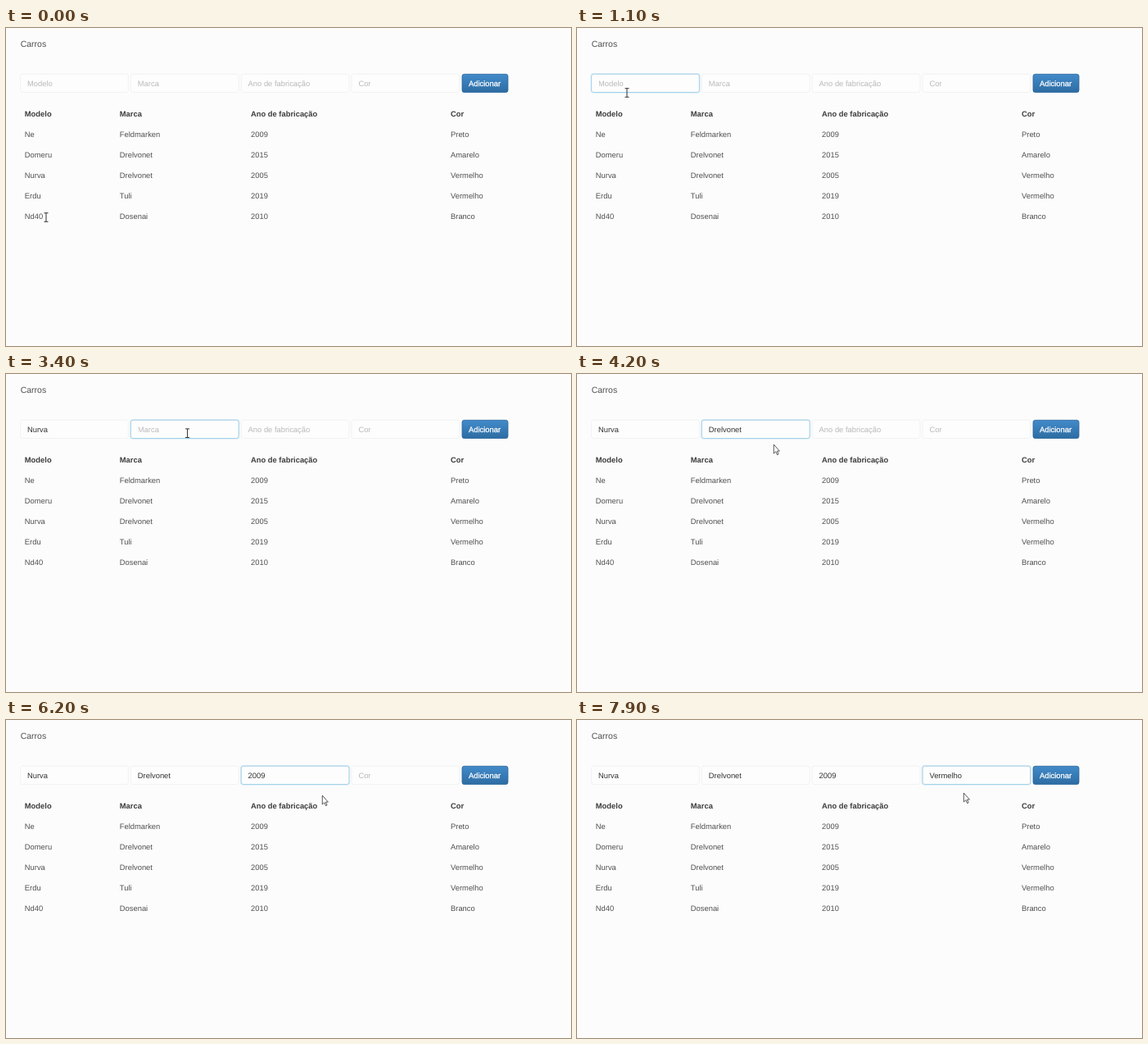
Write an HTML page that moves like this. It is 690 by 388 pixels and loops after 8 s.

```html
<!DOCTYPE html>
<html lang="pt">
<head>
<meta charset="utf-8">
<title>Carros</title>
<style>
  html, body { margin: 0; width: 100%; height: 100%; overflow: hidden; background: #fcfcfc; }
  svg { display: block; width: 690px; height: 388px; }
  text { font: 9.4px "Liberation Sans", Arial, sans-serif; fill: #505050; text-rendering: geometricPrecision; }
  .title { font-size: 10.5px; }
  .head { font-weight: bold; fill: #3c3c3c; }
  .field rect { fill: #fdfdfd; }
  .hint { fill: #b9b9b9; }
  .value { fill: #333; }
  .caret { fill: #222; }
  .button { fill: #fff; stroke: #fff; stroke-width: .3px; }
</style>
</head>
<body>
<svg id="stage" viewBox="0 0 690 388" xmlns="http://www.w3.org/2000/svg">
  <defs>
    <linearGradient id="blue" x2="0" y2="1">
      <stop stop-color="#428bca"/><stop offset="1" stop-color="#2d6ca2"/>
    </linearGradient>
  </defs>
  <text class="title" x="17.7" y="22.8">Carros</text>
  <g id="table"></g>
  <g id="form"></g>
  <rect x="557" y="56.3" width="56" height="22.2" rx="2.6" fill="url(#blue)" stroke="#2b669a" stroke-width=".8"/>
  <text class="button" x="565" y="71">Adicionar</text>
  <g id="pointer">
    <path id="arrow" d="M.3 0V11L2.8 8.7L4.5 12.6L6.1 11.9L4.4 8.1H7.4Z" fill="#fff" stroke="#333" stroke-width=".8"/>
    <path id="beam" d="M-2.5-5.3H2.5M0-5.3V5.3M-2.5 5.3H2.5" fill="none" stroke="#333"/>
  </g>
</svg>
<script>
const LOOP = 8000, STEP = 100, BLINK = 500;
const $ = id => document.getElementById(id);

function add(parent, tag, attrs, text = '') {
  const el = document.createElementNS('http://www.w3.org/2000/svg', tag);
  for (const k in attrs) el.setAttribute(k, attrs[k]);
  el.textContent = text;
  return parent.appendChild(el);
}

const labels = ['Modelo', 'Marca', 'Ano de fabricação', 'Cor'];
const columns = [22.8, 138.8, 299, 543];
const cars = [
  ['Ne', 'Feldmarken', '2009', 'Preto'],
  ['Domeru', 'Drelvonet', '2015', 'Amarelo'],
  ['Nurva', 'Drelvonet', '2005', 'Vermelho'],
  ['Erdu', 'Tuli', '2019', 'Vermelho'],
  ['Nd40', 'Dosenai', '2010', 'Branco']
];

labels.forEach((s, i) => add($('table'), 'text', { class: 'head', x: columns[i], y: 108 }, s));
cars.forEach((car, r) => car.forEach((s, i) =>
  add($('table'), 'text', { x: columns[i], y: 133.4 + r * 25 }, s)));

// Hovering a suggestion previews it; picking it moves the caret to the end.
const steps = [
  { focus: 1000, previews: [[1500, 'Nurva']], pick: 2100 },
  { focus: 3000, previews: [[3500, 'Drelvonet']], pick: 4000 },
  { focus: 4700, previews: [[5100, '2019'], [5200, '2009']], pick: 6000 },
  { focus: 6700, previews: [[7300, 'Vermelho']], pick: 7800 }
];

const fields = steps.map((s, i) => {
  const x = 17.6 + i * 134.8;
  const g = add($('form'), 'g', { class: 'field' });
  const box = { x, y: 56.2, width: 131.8, height: 22.3, rx: 2.6 };
  return {
    ...s, x: x + 8.4,
    blur: i < 3 ? steps[i + 1].focus : Infinity,
    glow: add(g, 'rect', { ...box, stroke: '#d9eef8', 'stroke-width': 2.4 }),
    frame: add(g, 'rect', { ...box, stroke: '#f0f1f1', 'stroke-width': .9 }),
    ring: add(g, 'rect', { ...box, stroke: '#9dcfe8', 'stroke-width': .9 }),
    hint: add(g, 'text', { class: 'hint', x: x + 8.4, y: 71 }, labels[i]),
    value: add(g, 'text', { class: 'value', x: x + 8.4, y: 71 }),
    caret: add(g, 'rect', { class: 'caret', y: 62.2, width: .9, height: 10.6 })
  };
});

// Pointer stops: time, x, y
const path = [
  [0, 49, 231], [800, 61, 79], [1300, 61, 79], [1600, 57, 98],
  [2000, 57, 98], [2400, 119, 84], [2700, 222, 68], [3300, 222, 68],
  [3700, 219, 95], [3900, 219, 95], [4200, 240, 86], [4700, 322, 70],
  [4900, 322, 70], [5100, 326, 88], [5300, 330, 117], [5900, 330, 117],
  [6200, 386, 92], [6700, 462, 69], [6900, 462, 69], [7500, 470, 95],
  [7700, 470, 95], [7900, 472, 89], [LOOP, 472, 89]
];

const same = (a, b) => a[1] === b[1] && a[2] === b[2];

function slope(i, k) {
  const a = path[i - 1], p = path[i], b = path[i + 1];
  if (!a || !b || same(a, p) || same(p, b)) return 0;
  return (b[k] - a[k]) / (b[0] - a[0]);
}

function pointerAt(t) {
  let i = 0;
  while (i < path.length - 2 && t >= path[i + 1][0]) i++;
  const a = path[i], b = path[i + 1], d = b[0] - a[0], u = (t - a[0]) / d;
  const s = u * u * (3 - 2 * u);
  return [1, 2].map(k => a[k] + (b[k] - a[k]) * s
    + d * u * (1 - u) * ((1 - u) * slope(i, k) - u * slope(i + 1, k)));
}

const clamp = v => Math.min(1, Math.max(0, v));
const fade = (t, from) => clamp((t - from + 100) / 200);
const show = (el, on) => el.setAttribute('visibility', on ? 'visible' : 'hidden');

function drawField(f, t) {
  const lit = t < f.focus ? 0 : t < f.blur ? fade(t, f.focus) : 1 - fade(t, f.blur);
  f.ring.setAttribute('opacity', lit);
  f.glow.setAttribute('opacity', lit);
  f.ring.style.fill = f.glow.style.fill = 'none';

  const shown = f.previews.filter(p => t >= p[0]).pop();
  f.value.textContent = shown ? shown[1] : '';
  show(f.hint, !shown);

  const picked = t >= f.pick;
  const since = picked ? f.pick : shown ? shown[0] : f.focus;
  const on = t >= f.focus && t < f.blur && Math.floor((t - since) / BLINK) % 2 === 0;
  show(f.caret, on);
  f.caret.setAttribute('x', f.x + (picked ? f.value.getComputedTextLength() : 0));
}

function draw(t) {
  fields.forEach(f => drawField(f, t));
  const [x, y] = pointerAt(t);
  const beam = t < STEP || y < 85;
  $('pointer').setAttribute('transform', `translate(${x} ${y})`);
  show($('beam'), beam);
  show($('arrow'), !beam);
}

let start;
function tick(now) {
  start ??= now;
  draw(Math.floor((now - start) % LOOP / STEP) * STEP);
  requestAnimationFrame(tick);
}
draw(0);
requestAnimationFrame(tick);
</script>
</body>
</html>
```
